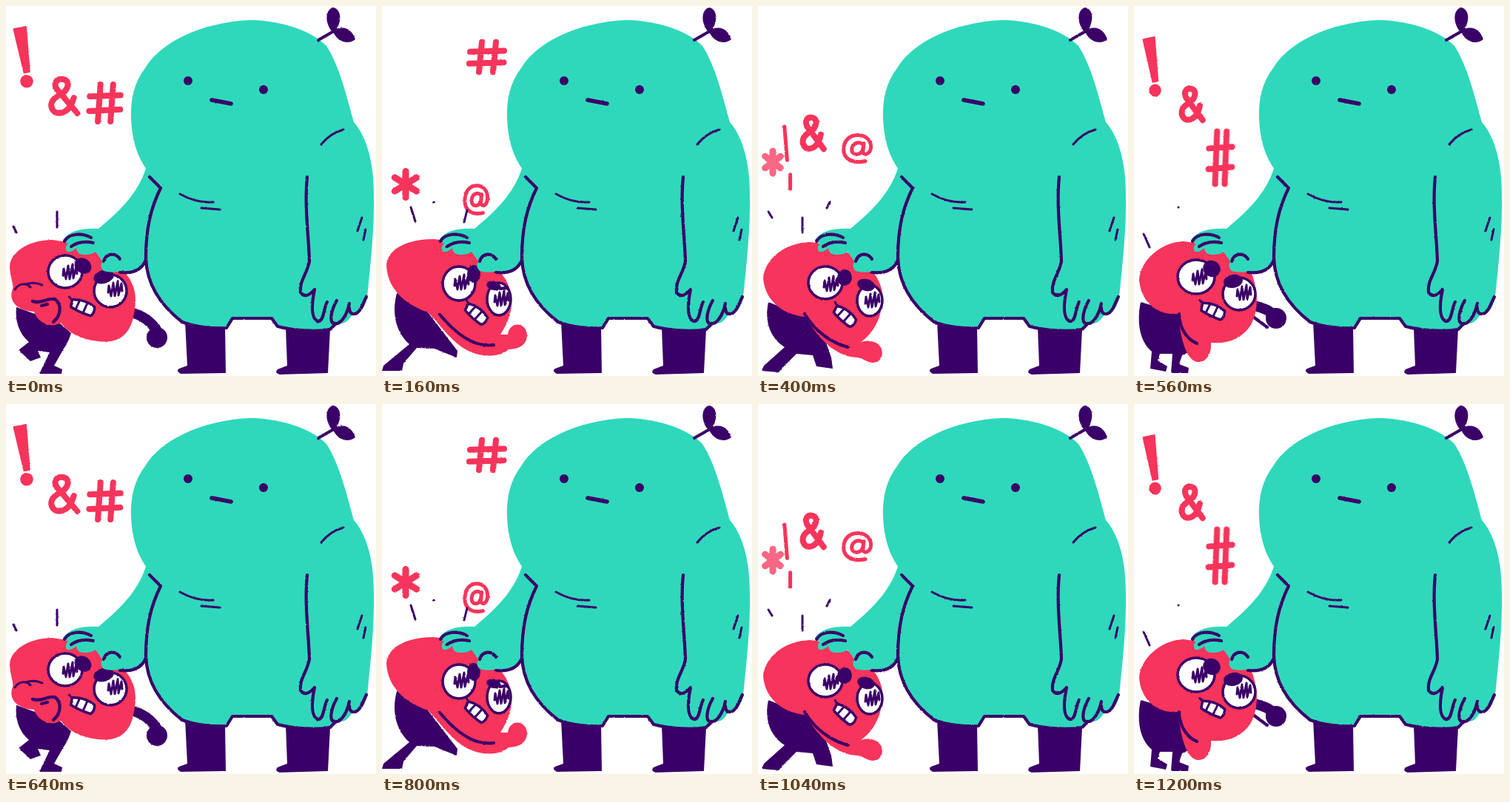
An HTML page for the animation above (1.28 s loop, 500 by 500 pixels).

```html
<!DOCTYPE html>
<html lang="en">
<head>
<meta charset="utf-8">
<title>Grumpy little one</title>
<style>
  html, body { margin: 0; width: 100%; height: 100%; overflow: hidden; background: #fff; }
  svg { display: block; width: 100%; height: 100%; }
  .ink { fill: none; stroke: #3b0068; stroke-width: 4.2; stroke-linecap: round; stroke-linejoin: round; }
  .dark { fill: #3b0068; }
  .red { fill: #f7345b; }
  .green { fill: #2fd8bb; }
  .arm { stroke-width: 14; }
  .thin { stroke-width: 3; }
  .sign { fill: none; stroke: #f7345b; stroke-linecap: round; stroke-linejoin: round; }
  .sign path { vector-effect: non-scaling-stroke; }
</style>
</head>
<body>
<svg viewBox="0 0 500 500">
  <defs>
    <filter id="rough" filterUnits="userSpaceOnUse" x="0" y="0" width="500" height="500" color-interpolation-filters="sRGB">
      <feTurbulence id="grain" type="fractalNoise" baseFrequency=".4" numOctaves="2" seed="1"/>
      <feDisplacementMap in="SourceGraphic" scale="2" xChannelSelector="R" yChannelSelector="G"/>
    </filter>
  </defs>

  <g id="signs" filter="url(#rough)"></g>
  <g id="ticks" class="ink thin" filter="url(#rough)"></g>
  <g id="imp"></g>

  <g class="dark">
    <path d="M242 426L296 432L297 496L236 497Q229 493 234 490L245 486Z"/>
    <path d="M378 434L438 437L435 496L370 498Q362 496 367 491L380 486Z"/>
  </g>
  <g class="green">
    <path d="M190 216C181 248 160 272 125 301C104 300 86 303 77 316Q76 321 84 320Q78 328 83 332Q89 333 95 327Q96 337 107 336Q116 336 121 332L130 345Q126 353 132 358Q140 361 152 359C170 364 184 356 190 343L225 290V220Z"/>
    <path d="M169 152C168 125 174 102 188 84C208 50 262 22 330 19C380 20 417 37 433 54C450 80 460 120 470 157C485 174 497 205 497 255C498 300 493 345 488 394C486 405 478 420 468 416C464 425 455 433 447 427L440 437C415 441 384 437 367 434L359 422H306L298 435C280 436 254 433 240 428C212 408 189 380 189 335C190 300 196 270 208 246L190 221C177 203 170 180 169 152Z"/>
    <path d="M410 345C407 362 396 372 398 387Q405 397 415 387C412 407 413 422 421 426Q430 426 433 410Q437 425 444 428L480 410L488 370Z"/>
  </g>

  <g class="ink" filter="url(#rough)">
    <path d="M194 231L209 246C196 272 189 300 189 340C190 378 212 407 238 427C256 434 280 436 298 435L306 422H359L367 433C386 438 416 441 438 437L446 429M189 343C184 356 172 362 154 360"/>
    <path d="M407 231C403 270 409 310 410 345C407 362 396 372 398 387Q405 397 417 383C412 407 413 422 421 426C430 427 429 408 434 400M447 398C440 410 436 427 443 429C452 432 461 417 464 402M464 408C464 419 474 419 480 408L487 393"/>
    <path class="thin" d="M426 187Q438 172 456 167M235 254C249 262 263 266 280 265M264 273L289 275"/>
    <path class="thin" d="M481 286L475 304M486 302L483 316"/>
    <path d="M79 318C85 307 103 306 115 313M88 325C98 318 108 318 118 320M132 345C136 333 148 333 154 342"/>
    <path id="mouth" style="stroke-width:5.5" d="M278 127L304 132"/>
    <path d="M422 46L443 34"/>
    <path class="dark" stroke="none" d="M443 37C431 26 430 5 442 2C453 4 454 19 447 31C460 26 469 35 472 45C464 52 450 50 443 37Z"/>
  </g>
  <g class="dark"><circle cx="246" cy="101" r="6"/><circle cx="348" cy="113" r="6"/></g>
</svg>
<script>
const STEP = 80, COUNT = 8;
const $ = id => document.getElementById(id);
const path = (cls, d) => `<path class="${cls}" d="${d}"/>`;
const ball = (cls, x, y, r) => `<circle class="${cls}" cx="${x}" cy="${y}" r="${r}"/>`;
const brow = (x, y, rx, ry, turn) =>
  `<ellipse class="dark" rx="${rx}" ry="${ry}" transform="translate(${x} ${y}) rotate(${turn})"/>`;

function eye(x, y, rx, ry, dx, dy) {
  return `<g transform="translate(${x} ${y})">
    <ellipse rx="${rx}" ry="${ry}" class="ink" style="fill:#fff;stroke-width:3.5"/>
    <path class="ink thin" transform="translate(${dx} ${dy})" d="M-9 4L-8 -5L-5 9L-2 -9L0 9L4 -11L5 8L9 -8L10 2"/></g>`;
}

function teeth(x, y, turn) {
  return `<g transform="translate(${x} ${y}) rotate(${turn})">
    <path class="ink" style="fill:#fff;stroke-width:3.5" d="M-16 -4Q0 -11 16 -5Q19 3 15 8Q0 9 -14 6Z"/>
    <path class="ink thin" d="M-6 -7L-7 7M5 -7L4 8M-21 -6L-16 -4"/></g>`;
}

const poses = [
  // crouched, fist at chin
  path("ink arm", "M168 414C183 417 198 427 205 441") + ball("dark", 204, 448, 14) +
  path("dark", "M14 407L72 428L88 442C84 454 81 459 78 463L65 486L76 491L75 497H45L59 468L43 466L47 475L33 480L17 465L31 454C17 442 12 425 14 407Z") +
  path("red", "M5 352C6 330 35 316 62 316C100 320 142 336 162 362C179 382 176 404 171 425C164 448 148 456 124 453C100 450 85 442 74 428C60 437 42 427 38 413C18 412 4 402 8 385C12 378 6 370 5 352Z") +
  path("ink thin", "M12 383C18 374 28 374 33 380M27 376Q38 372 49 377") +
  path("ink", "M36 399C46 403 54 395 66 396C77 404 73 420 64 427M48 405L56 403") +
  eye(80, 359, 23, 22, 6, 1) + eye(141, 385, 22, 22, 6, -2) +
  brow(104, 351, 12, 10, 35) + brow(132, 366, 14, 9, -15) + teeth(103, 406, 20),

  // pushing, arm across
  path("dark", "M14 400L64 420L92 455L99 475L101 490L79 487L74 472L52 470L33 489L28 495L5 493L8 486L36 461C18 450 8 428 14 400Z") +
  path("red", "M7 368C9 342 36 320 70 319C108 322 146 342 160 366C172 386 169 402 164 420C158 437 148 448 139 454Q151 450 161 456C172 464 169 481 156 482C147 482 143 476 134 475C108 474 84 454 64 420C38 418 10 402 7 368Z") +
  path("ink", "M63 416C77 440 99 455 121 461") +
  eye(91, 374, 23, 22, 7, 2) + eye(151, 398, 17, 21, 3, 0) +
  brow(117, 367, 10, 11, 10) + brow(146, 377, 12, 8, 15) + teeth(117, 418, 38),

  // lunging
  path("dark", "M20 388L62 414L102 466L101 475L78 466L72 463L47 462L29 483L27 493L0 493L2 486L37 457C18 440 13 414 20 388Z") +
  path("red", "M6 350C8 327 36 315 70 315C106 318 148 340 166 368C178 388 178 408 168 430L160 444L170 444C172 426 194 426 196 444C196 461 180 464 171 464C154 479 123 472 108 461C89 448 75 426 62 414C28 402 7 380 6 350Z") +
  path("ink", "M78 417C98 441 124 462 151 458") +
  eye(104, 375, 22, 23, 3, -1) + eye(158, 396, 16, 22, 3, 0) +
  brow(124, 362, 9, 12, 0) + path("ink", "M145 377Q158 385 169 380") +
  brow(151, 378, 10, 6, 15) + teeth(127, 415, 38),

  // recoiling
  path("ink arm", "M154 404C166 405 178 408 188 416") + ball("dark", 192, 422, 14) +
  path("ink", "M161 420L180 434") +
  path("dark", "M9 400L60 415L86 450L78 466L65 472L61 484L74 489L73 496H50L52 470L35 470L32 479L45 487L43 494L22 490L24 467C6 452 4 424 9 400Z") +
  path("red", "M7 370C9 342 38 319 67 318C104 322 144 338 159 362C169 388 168 411 158 431C146 449 128 457 104 455C105 472 97 482 85 481C70 478 62 446 60 416C32 419 9 400 7 370Z") +
  path("ink", "M61 416C61 433 70 450 85 456") +
  eye(84, 366, 25, 23, 4, 1) + eye(142, 389, 22, 22, 6, -1) +
  brow(105, 355, 12, 11, 30) + brow(134, 372, 13, 9, -10) + teeth(106, 411, 22)
];

// shape in a box from -50 to 50, and line weight
const glyphs = {
  "#": ["M-14 -48L-22 48M24 -48L16 48M-46 -17L46 -20M-48 21L45 17", 8],
  "*": ["M0 -44V44M-40 -23L40 23M40 -23L-40 23", 9],
  "&": ["M46 46L-24 -20C-38 -42 -16 -48 -2 -46C24 -42 16 -18 -8 -6C-44 8 -48 24 -36 38C-22 52 14 46 28 18L34 4", 8],
  "@": ["M18 -12C10 -26 -18 -24 -20 2C-20 24 10 24 16 2L19 -18L16 10C18 24 40 20 42 -6C42 -34 20 -46 0 -46C-30 -46 -46 -24 -46 2C-46 34 -20 50 24 42", 5],
  "!": ["M-48 -46L15 -50L34 24L6 26ZM-11 40A30 9.5 0 1 0 49 40A30 9.5 0 1 0 -11 40Z", 2],
  "i": ["M-35 -50L-5 4M30 27V50", 5]
};

// glyph, x, y, width, height, opacity
const signs = [
  [["!", 23, 69, 26, 82], ["&", 78, 122, 40, 50], ["#", 134, 131, 45, 52]],
  [["#", 140, 94, 47, 43], ["*", 38, 272, 20, 34]],
  [["#", 142, 69, 50, 42], ["*", 32, 241, 37, 40], ["@", 128, 262, 35, 42]],
  [["*", 28, 227, 37, 42], ["@", 133, 222, 38, 44], ["&", 63, 282, 22, 40]],
  [["*", 25, 218, 37, 42], ["&", 69, 243, 24, 48], ["@", 135, 199, 42, 42]],
  [["*", 20, 211, 26, 34, .75], ["&", 74, 172, 32, 46], ["@", 135, 193, 42, 40], ["i", 40, 205, 12, 84]],
  [["!", 29, 115, 22, 82], ["&", 77, 147, 32, 45], ["#", 108, 262, 28, 62]],
  [["!", 24, 82, 24, 80], ["&", 78, 133, 32, 46], ["#", 117, 205, 34, 74]]
];

const ticks = [
  "M10 298L14 306M69 278V299",
  "M16 279L19 286M60 286V306M95 265L93 273",
  "M39 272L45 291M70 265V265M115 276L111 292",
  "M60 272V272M13 308L21 326",
  "M37 257L38 260M18 287L25 303M95 274L91 295",
  "M14 278L19 286M60 286V306M97 265L93 273",
  "M39 272L45 291M70 265V265M115 276L111 292",
  "M60 272V272M13 308L21 326"
];

function drawSign([key, x, y, w, h, alpha = 1]) {
  const [shape, weight] = glyphs[key];
  const fill = key === "!" ? "#f7345b" : "none";
  return `<g class="sign" opacity="${alpha}" style="stroke-width:${weight};fill:${fill}"
    transform="translate(${x} ${y}) scale(${w / 100} ${h / 100})"><path d="${shape}"/></g>`;
}

const imp = $("imp");
imp.innerHTML = poses.map(p => `<g filter="url(#rough)">${p}</g>`).join("");

let last = -1;
function show(step) {
  if (step === last) return;
  last = step;
  const pose = step % poses.length;
  [...imp.children].forEach((g, i) => { g.style.display = i === pose ? "" : "none"; });
  $("signs").innerHTML = signs[step].map(drawSign).join("");
  $("ticks").innerHTML = `<path d="${ticks[step]}"/>`;
  $("grain").setAttribute("seed", pose + 1);
}

const start = performance.now();
function tick(now) {
  show(Math.floor(Math.max(0, now - start) / STEP) % COUNT);
  requestAnimationFrame(tick);
}
show(0);
requestAnimationFrame(tick);
</script>
</body>
</html>
```
